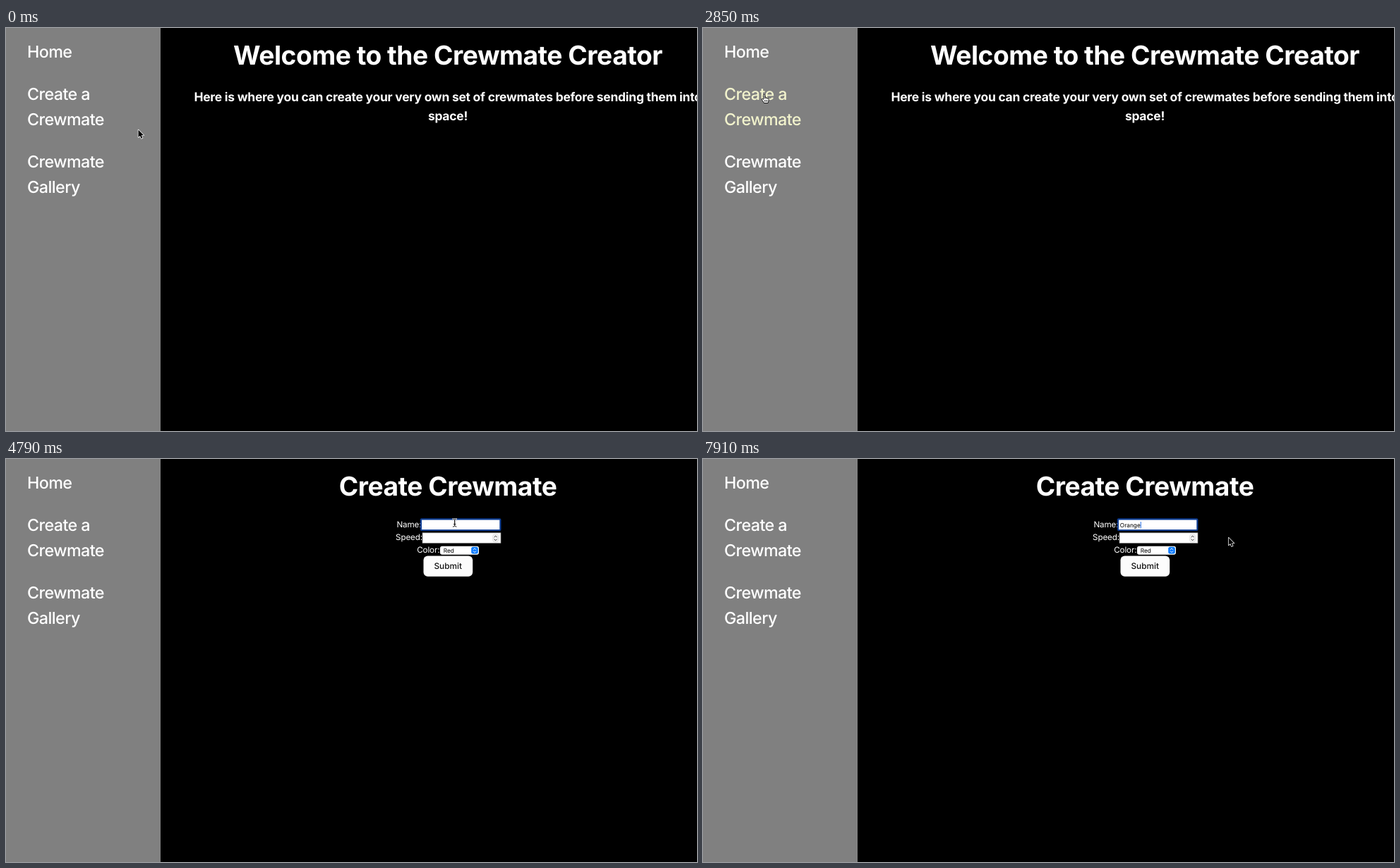
An HTML page that plays this animation: 979x572 px, repeating every 8 s.

```html
<!DOCTYPE html>
<html lang="en">
<head>
<meta charset="utf-8">
<title>Crewmate Creator</title>
<style>
  html, body { margin: 0; width: 100%; height: 100%; overflow: hidden; background: #000; }
  svg { display: block; width: 979px; height: 572px; }
  text {
    font-family: Inter, "Open Sans", sans-serif;
    font-optical-sizing: none;
    text-rendering: geometricPrecision;
    fill: #fff;
  }
  .nav { font-size: 23.3px; font-weight: 500; letter-spacing: -0.025em; }
  .title { font-size: 37.2px; font-weight: 700; letter-spacing: -0.013em; text-anchor: middle; }
  .intro { font-size: 17.45px; font-weight: 700; letter-spacing: -0.014em; text-anchor: middle; }
  .label { font-size: 11.65px; letter-spacing: -0.01em; text-anchor: end; }
  .button { font-size: 11.8px; font-weight: 500; text-anchor: middle; fill: #111; }
  .small { font-size: 8.3px; fill: #000; }
  .hover text { fill: #f1f2cc; }
  .arrow { fill: #000; stroke: #fff; stroke-width: 1.5; paint-order: stroke; stroke-linejoin: round; }
  .hand { fill: #fff; stroke: #000; stroke-width: 0.9; stroke-linejoin: round; }
  .beam { fill: none; stroke-linecap: round; }
  .chevron { fill: none; stroke-width: 1; stroke-linecap: round; stroke-linejoin: round; }
</style>
</head>
<body>
<svg viewBox="0 0 979 572">
  <defs>
    <path id="beamShape" d="M-2.4 -5.6Q0 -5.6 0 -4V4Q0 5.6 -2.4 5.6M2.4 -5.6Q0 -5.6 0 -4V4Q0 5.6 2.4 5.6M-1.3 2H1.3"/>
  </defs>
  <rect width="979" height="572"/>
  <rect width="219" height="572" fill="#808080"/>

  <g class="nav">
    <text x="30" y="41.5">Home</text>
    <g id="createLink">
      <text x="30" y="101.5">Create a</text>
      <text x="30" y="137.5">Crewmate</text>
    </g>
    <text x="30" y="197.5">Crewmate</text>
    <text x="30" y="233.5">Gallery</text>
  </g>

  <g id="homePage">
    <text class="title" x="626" y="51.5">Welcome to the Crewmate Creator</text>
    <text class="intro" x="626" y="103.5">Here is where you can create your very own set of crewmates before sending them into</text>
    <text class="intro" x="626" y="130.5">space!</text>
  </g>

  <g id="formPage">
    <text class="title" x="626" y="51.5">Create Crewmate</text>

    <text class="label" x="588.5" y="97">Name:</text>
    <rect x="588.5" y="86" width="111" height="14.8" fill="#fff" stroke="#888" stroke-width="0.7"/>
    <g id="focus">
      <rect x="586.8" y="84.3" width="114.6" height="17.6" rx="2" fill="#0c3d94"/>
      <rect x="589" y="86.5" width="110.3" height="13.6" fill="#fff"/>
    </g>
    <text id="typed" class="small" x="590.8" y="97"></text>
    <rect id="caret" y="89" width="1" height="9.5" fill="#2470e8"/>

    <text class="label" x="590" y="115">Speed:</text>
    <rect x="590" y="104.8" width="111" height="14.5" fill="#fff" stroke="#888" stroke-width="0.7"/>
    <rect x="689.7" y="107" width="7.8" height="10.8" rx="2.5" fill="#f3f3f3" stroke="#d4d4d4" stroke-width="0.6"/>
    <path class="chevron" stroke="#333" d="M691.9 110.8l1.7-1.7 1.7 1.7M691.9 114l1.7 1.7 1.7-1.7"/>

    <text class="label" x="614.5" y="133">Color:</text>
    <rect x="615" y="123.7" width="55" height="12" rx="3" fill="#fff"/>
    <text class="small" x="619.7" y="132.8">Red</text>
    <rect x="659.2" y="124.8" width="9.6" height="9.8" rx="2.5" fill="#087aff"/>
    <path class="chevron" stroke="#fff" d="M662.2 128.6l1.8-1.8 1.8 1.8M662.2 130.8l1.8 1.8 1.8-1.8"/>

    <rect x="591.5" y="137.6" width="69.7" height="29.2" rx="6" fill="#fcfcfc"/>
    <text class="button" x="626.2" y="156.3">Submit</text>
  </g>

  <g id="cursor">
    <path class="arrow" d="M0 0V10.6L2.4 8.4L4.2 12.3L5.9 11.5L4.2 7.8H7.6Z"/>
    <path class="hand" d="M-1 1C-1 -.4 1 -.4 1 1V4.2C1.4 3.5 2.8 3.6 3 4.6C3.5 4 4.7 4.2 4.9 5.1C5.5 4.7 6.6 5 6.6 6.1V8.3C6.6 9.7 5.6 10.3 5.6 12H-.2C-.4 10.2 -2.6 8.6 -3.2 7C-3.6 5.9 -2.2 5.4 -1 7ZM1 4.2V6M3 4.6V6M4.9 5.1V6.3M1 8V10M2.7 8V10M4.4 8V10"/>
    <g class="beam">
      <use href="#beamShape" stroke="#fff" stroke-width="2"/>
      <use href="#beamShape" stroke="#111" stroke-width="0.9"/>
    </g>
  </g>
</svg>
<script>
  const LOOP = 8000;
  const byId = id => document.getElementById(id);
  const cursor = byId('cursor');
  const [arrow, hand, beam] = cursor.children;

  // Each track is a list of held states: [start time, ...values].
  const moves = [
    [0, 187.5, 144.5, arrow],
    [450, 183, 144, arrow], [600, 181, 143, arrow], [750, 188, 142, arrow], [900, 192, 141, arrow],
    [1200, 188, 138, arrow],
    [1650, 178, 136, arrow], [1800, 153, 131, arrow], [1950, 126.3, 124.3, arrow],
    [2100, 101, 106, hand], [2250, 89, 94, hand], [2400, 87, 95, hand],
    [2700, 86.5, 94.5, hand], [3000, 86.3, 93.5, arrow],
    [3300, 290, 86, arrow], [3440, 531.5, 79, arrow],
    [3740, 588, 76, arrow], [3890, 626, 93, beam], [4040, 637, 92, beam], [4190, 635.7, 90.5, beam],
    [7170, 624, 112, arrow], [7320, 592, 158, arrow], [7470, 583.5, 172, arrow],
    [7610, 640, 168, arrow], [7760, 722, 126, arrow], [7910, 744.7, 111.7, arrow]
  ];
  const caretAlpha = [
    [0, 0], [4190, 1], [4790, 0], [5090, 0.5], [5230, 1],
    [5680, 0.5], [5820, 0], [6120, 1]
  ];
  const entries = [[0, '', 8.3], [6570, 'o', 10.8], [7470, 'Orange', 8.3]];

  const stateAt = (track, t) => track.findLast(([start]) => start <= t).slice(1);
  const within = (t, from, to) => t >= from && t < to;
  const show = (node, visible) => node.style.display = visible ? '' : 'none';

  function draw(t) {
    const [x, y, shape] = stateAt(moves, t);
    cursor.setAttribute('transform', `translate(${x} ${y})`);
    for (const node of [arrow, hand, beam]) show(node, node === shape);

    byId('createLink').classList.toggle('hover', within(t, 2100, 3300));
    show(byId('homePage'), t < 3000);
    show(byId('formPage'), t >= 3000);
    show(byId('focus'), t >= 4190);

    const [value, size] = stateAt(entries, t);
    const typed = byId('typed');
    typed.textContent = value;
    typed.style.fontSize = size + 'px';
    const width = value ? typed.getComputedTextLength() : 0;
    byId('caret').setAttribute('x', 590.8 + width);
    byId('caret').setAttribute('opacity', stateAt(caretAlpha, t)[0]);
  }

  const begin = performance.now();
  function tick() {
    draw((performance.now() - begin) % LOOP);
    requestAnimationFrame(tick);
  }
  draw(0);
  requestAnimationFrame(tick);
</script>
</body>
</html>
```
